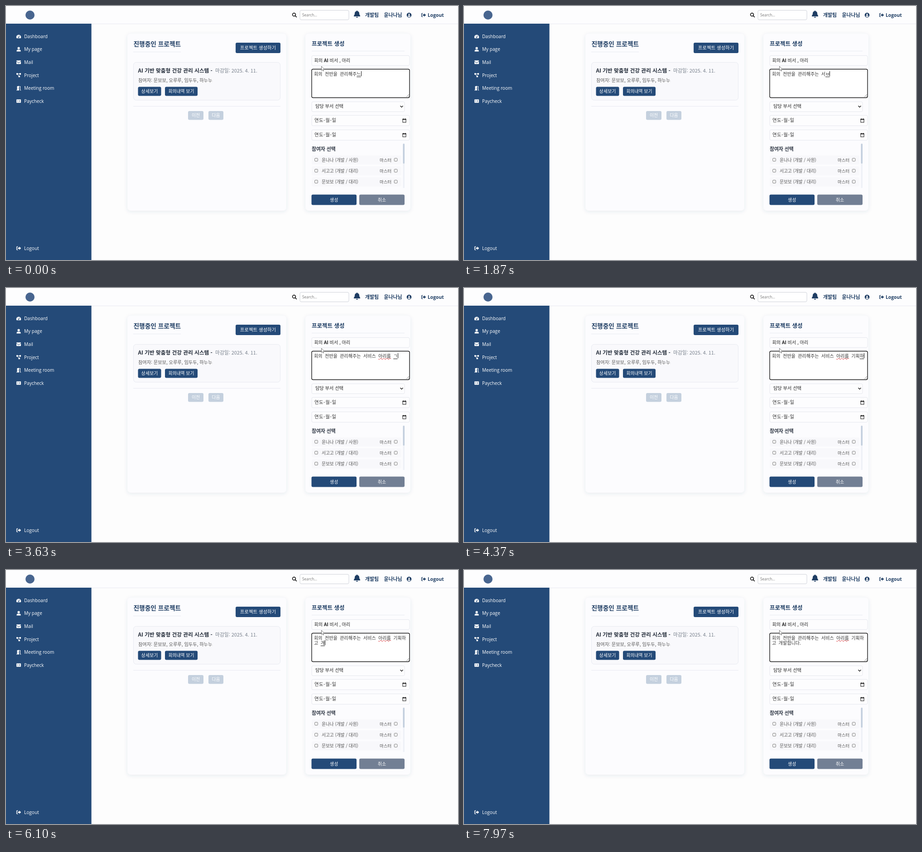
Recreate the animation shown at these times as an HTML page. Size 998 by 561 pixels, loop 8 s.

```html
<!DOCTYPE html>
<html lang="ko">
<head>
<meta charset="utf-8">
<style>
html, body { margin: 0; width: 100%; height: 100%; overflow: hidden; background: #fdfdfd; }
svg { position: absolute; left: 0; top: 0; }
svg, #note { font-family: "Noto Sans CJK KR", "Noto Sans CJK", sans-serif; }
#note {
  position: absolute; left: 680px; top: 144px; width: 206px; height: 55px;
  font-size: 10.1px; line-height: 11px; word-spacing: 2.5px; color: #333;
  white-space: pre-wrap; word-break: break-all;
}
.composing { text-decoration: underline #222 1px; text-underline-offset: 1.5px; text-decoration-skip-ink: none; }
.misspelt { text-decoration: underline wavy #d8383c .6px; text-underline-offset: 0; text-decoration-skip-ink: none; }
.caret { position: absolute; width: 1px; height: 11px; background: #111; }
</style>
</head>
<body>
<svg id="page" width="998" height="561" viewBox="0 0 998 561"></svg>
<div id="note"></div>
<script>
const NAVY = '#244a78', INK = '#1e3d63', LINE = '#e8eaf1';
const LATIN = '"Open Sans", "Noto Sans", sans-serif';

const text = (x, y, label, size, fill, extra = '') =>
  `<text x="${x}" y="${y}" font-size="${size}" fill="${fill}" ${extra}>${label}</text>`;
const latin = (x, y, label, size, fill, weight = 400) =>
  text(x, y, label, size, fill, `font-weight="${weight}" style='font-family:${LATIN}'`);
const box = (x, y, w, h, r, fill, stroke = 'none', extra = '') =>
  `<rect x="${x}" y="${y}" width="${w}" height="${h}" rx="${r}" fill="${fill}" stroke="${stroke}" ${extra}/>`;
const rule = (x1, x2, y) => `<path d="M${x1} ${y}H${x2}" stroke="${LINE}"/>`;
const button = (x, y, w, h, label, size, fill = NAVY) =>
  box(x, y, w, h, 3, fill) +
  text(x + w / 2, y + h / 2 + size * .38, label, size, '#fff', 'text-anchor="middle"');
const card = (x, w) => box(x, 61, w, 391, 8, '#fcfcfe', 'none', 'filter="url(#soft)"');
const field = (y, w, h = 22) => box(675, y + .5, w, h, 3, '#fdfdfe', '#e6e8ee');
const bold = 'font-weight="700"';

// Icons are drawn around their centre, about 10 px wide.
const icons = {
  gauge: c => `<path d="M-5 3.6a5.3 5.3 0 1 1 10 0q-.3.6-1 .6h-8q-.7 0-1-.6z" fill="${c}"/>
    <path d="M0 2L2-2M-3 1h.8M-2-2h.8M2.6 1h.8" stroke="${NAVY}"/><circle cy="2.2" r="1.2" fill="${NAVY}"/>`,
  person: c => `<circle cy="-2.5" r="2.6" fill="${c}"/><path d="M-4.5 5V3.5q0-2.6 2.6-2.6h3.8q2.6 0 2.6 2.6V5z" fill="${c}"/>`,
  mail: c => `<rect x="-5" y="-4" width="10" height="8" rx="1" fill="${c}"/><path d="M-5-2L0 1.6 5-2" fill="none" stroke="${NAVY}"/>`,
  nodes: c => `<path d="M-5-4.5h3.5v3.5H-5zM1.5-4.5H5v3.5H1.5zM-.5 1H3v3.5H-.5z" fill="${c}"/>
    <path d="M-2-2.8h4M-2.8-1.5L.5 2" stroke="${c}"/>`,
  door: c => `<path d="M-3.5-4.2L1-5V5h-6V4h1.5zM1.8-4.2H4V4h1.2v1H3V-3H1.8z" fill="${c}"/><circle cx="-.6" r=".6" fill="${NAVY}"/>`,
  check: c => `<rect x="-5" y="-3.7" width="10" height="7.4" rx="1" fill="${c}"/><path d="M-3.5-1.2h2M-3.5.8h2M.2-1.2h3.3M.2 1h3.3" stroke="${NAVY}" stroke-width=".8"/>`,
  exit: c => `<path d="M-1.6-3.6h-1.6q-1.2 0-1.2 1.2v4.8q0 1.2 1.2 1.2h1.6" fill="none" stroke="${c}" stroke-width="1.4"/>
    <path d="M-2.2-1.3H1.2v-2.4L5.2 0 1.2 3.7V1.3h-3.4z" fill="${c}"/>`,
  search: c => `<g fill="none" stroke="${c}" stroke-width="1.7"><circle cx="-1" cy="-1" r="3.4"/><path d="M1.6 1.6L4.8 4.8"/></g>`,
  bell: c => `<path d="M0-8q1 0 1 1.2 4 .8 4 5.3 0 3 2 4.9V5H-7V3.4q2-1.9 2-4.9 0-4.5 4-5.3Q-1-8 0-8zM-2 6H2a2 2 0 0 1-4 0z" fill="${c}"/>`,
  user: c => `<circle r="5.3" fill="${c}"/><circle cy="-1.5" r="1.7" fill="#fdfdfe"/><path d="M-3 3q.3-2.2 2-2.2h2q1.7 0 2 2.2-3 2.3-6 0z" fill="#fdfdfe"/>`,
  calendar: c => `<rect x="-3.5" y="-3" width="7" height="7" fill="none" stroke="${c}"/><path d="M-4-2.5h8M-2.3-4.5v2M2.3-4.5v2" stroke="${c}" stroke-width="1.3"/>`
};
const icon = (name, x, y, color) => `<g transform="translate(${x} ${y})">${icons[name](color)}</g>`;

const menu = [['gauge', 'Dashboard'], ['person', 'My page'], ['mail', 'Mail'],
  ['nodes', 'Project'], ['door', 'Meeting room'], ['check', 'Paycheck']];
const menuItem = (name, label, y) => icon(name, 28, y, '#fff') + latin(40, y + 3.8, label, 10.1, '#fff', 500);

const sidebar = box(0, 39, 188.6, 522, 0, NAVY) +
  menu.map(([name, label], i) => menuItem(name, label, 67 + i * 28.6)).join('') +
  menuItem('exit', 'Logout', 535);

const header = box(0, 0, 998, 39, 0, '#fdfdfe') + rule(0, 998, 39.5) +
  '<circle cx="53" cy="20" r="10" fill="#48658f"/>' +
  icon('search', 637, 20, '#222') +
  box(649, 9.5, 108, 21, 3, '#fff', '#d0d3da') + latin(654, 22.5, 'Search...', 8.4, '#777') +
  icon('bell', 775, 18, INK) +
  text(793, 24, '개발팀', 10.9, INK, bold) + text(834.5, 24, '윤나나님', 10.9, INK, bold) +
  icon('user', 890, 20, INK) + icon('exit', 922, 20, INK) + latin(931, 23.7, 'Logout', 10.3, INK, 700);

const projects = card(268, 351) +
  text(281.5, 88.5, '진행중인 프로젝트', 13.7, INK, bold) + rule(281, 386, 101.5) +
  button(507, 81, 99, 23, '프로젝트 생성하기', 10.4) +
  box(281.5, 124.5, 324, 83.5, 6, '#f9f9fc', LINE) +
  text(291.5, 146.5, 'AI 기반 맞춤형 건강 관리 시스템 -', 11.7, '#222b38', bold) +
  text(462, 146.5, '마감일: 2025. 4. 11.', 10.8, '#78808c') +
  text(292, 167.5, '참여자: 문보보, 오루루, 임두두, 하누누', 10.2, '#555') +
  button(291.5, 178.5, 51, 20, '상세보기', 10) + button(351, 178.5, 72, 20, '회의내역 보기', 9.8) +
  rule(281, 606, 221.5) +
  button(402, 232, 34, 19.5, '이전', 9.8, '#c4d0de') + button(447, 232, 33, 19.5, '다음', 9.8, '#c4d0de');

const tick = (x, y) => box(x, y, 6.5, 6.5, 1.2, '#fff', '#777');
const member = (label, i) => {
  const y = 340 + i * 24.2;
  return box(675, y - 10, 198, 20, 3, '#f8f8fb') + tick(681.8, y - 3.7) +
    text(697, y + 3.7, label, 9.7, '#555') + text(825, y + 3.7, '마스터', 9.5, '#555') + tick(857.3, y - 3.7);
};
const dateField = y => field(y, 216, 23) +
  text(681, y + 15, '연도-월-일', 10.4, '#333', 'letter-spacing=".5"') + icon('calendar', 879.5, y + 12, '#111');

const form = card(661, 232) +
  text(675, 87.5, '프로젝트 생성', 12.5, INK, bold) + rule(675, 880, 99.5) +
  field(109, 216) +
  text(680.5, 124, '회의 <tspan font-weight="700">AI</tspan> 비서 , 아리', 10.1, '#222', 'font-weight="500"') +
  box(675, 139.5, 216, 63, 3, '#fff', '#1a1a1a', 'stroke-width="1.4"') +
  '<path d="M884 201l6-6M887.5 201l2.5-2.5" stroke="#777" stroke-width=".8"/>' +
  field(211, 205) + text(683, 225, '담당 부서 선택', 10.2, '#222') +
  '<path d="M870.5 220.5l3 3 3-3" fill="none" stroke="#222" stroke-width="1.5"/>' +
  dateField(241) + dateField(273) +
  text(675, 320, '참여자 선택', 10.8, '#2b3340', bold) +
  ['윤나나 (개발 / 사원)', '서고고 (개발 / 대리)', '문보보 (개발 / 대리)'].map(member).join('') +
  box(876.5, 304, 3.5, 98, 1.5, '#eff1f7') + box(876.5, 304, 3.5, 44, 1.5, '#c3cfde') +
  button(674.5, 416.5, 99.5, 23, '생성', 10) + button(780, 416.5, 100, 23, '취소', 10, '#727f94');

const pointer = '<path d="M696.5 133v9.500l2.2-2 1.5 3.3 1.5-.7-1.5-3.2h2.8z" fill="#fff" stroke="#555" stroke-width=".8"/>';

document.getElementById('page').innerHTML =
  `<filter id="soft" x="-10%" y="-10%" width="120%" height="120%">
    <feDropShadow dx="0" dy="2" stdDeviation="4" flood-color="#33447a" flood-opacity=".1"/></filter>` +
  header + sidebar + projects + form + pointer;

// Hangul keystrokes: initial consonant, then vowel, then final consonant.
const INITIALS = 'ㄱㄲㄴㄷㄸㄹㅁㅂㅃㅅㅆㅇㅈㅉㅊㅋㅌㅍㅎ';
function strokes(char) {
  const code = char.charCodeAt(0) - 0xAC00;
  if (code < 0) return [char];
  const open = String.fromCharCode(0xAC00 + code - code % 28);
  return [...new Set([INITIALS[Math.floor(code / 588)], open, char])];
}

const LEAD = '회의 전반을 관리해주';
const SECOND = LEAD + '는 서비스 아리를 기획하고 ';
const bursts = [
  { start: -260, step: 130, before: LEAD, typed: '는 아' },
  { start: 1480, step: 130, before: LEAD + '는 ', typed: '서비스 아리를 기획하고 ㄱ' },
  { start: 5470, step: 130, before: SECOND, typed: '개' },
  { start: 6150, step: 110, before: SECOND + '개', typed: '발합니다.' }
];
const states = bursts.flatMap(({ start, step, before, typed }) => {
  const list = [{ at: start, done: before, composing: '' }];
  let done = before;
  for (const char of typed) {
    for (const part of strokes(char)) {
      const at = start + step * list.length;
      list.push(/[ .]/.test(part) ? { at, done: done + part, composing: '' } : { at, done, composing: part });
    }
    done += char;
  }
  return list;
});

const LOOP = 8000, BLINK = 530;
const note = document.getElementById('note');
let shown = '';
function frame(now) {
  const t = now % LOOP;
  const state = states.filter(s => s.at <= t).pop();
  const caretOn = Math.floor((t - state.at) / BLINK) % 2 === 0;
  const html = state.done.replace('아리를 ', '<span class="misspelt">아리를</span> ') +
    `<span class="composing">${state.composing}</span>` + (caretOn ? '<span class="caret"></span>' : '');
  if (html !== shown) note.innerHTML = shown = html;
  requestAnimationFrame(frame);
}
frame(performance.now());
</script>
</body>
</html>
```
